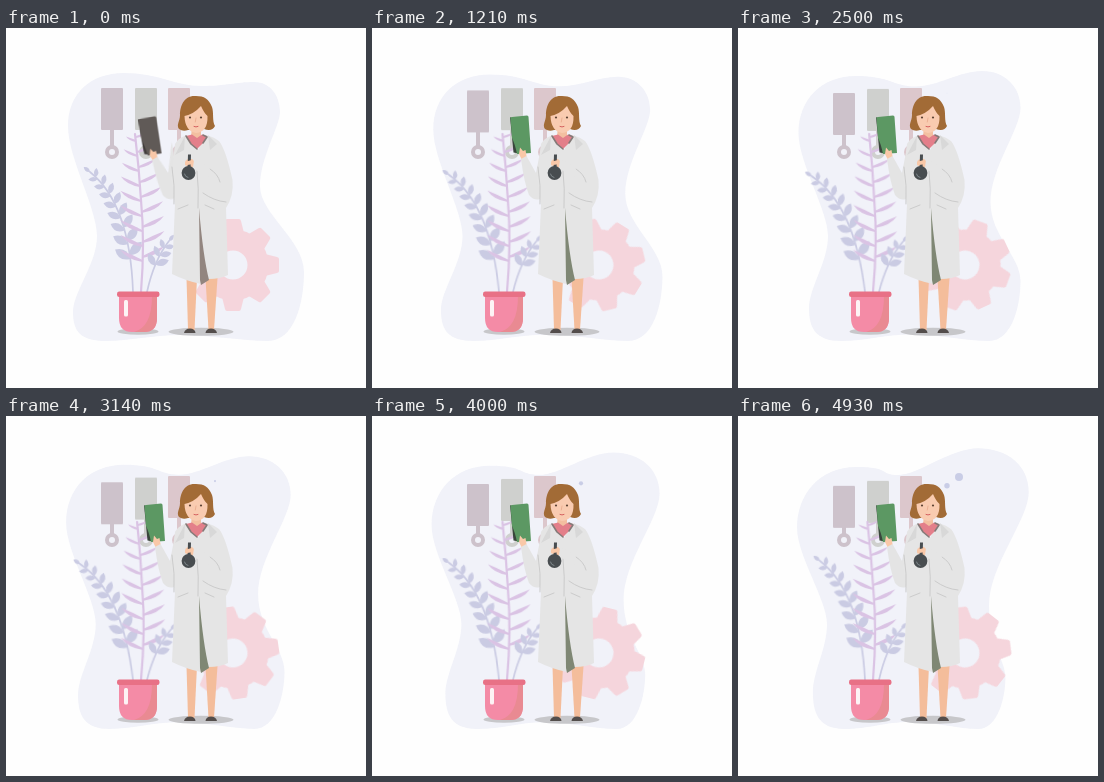
An HTML page that plays this animation: 360 by 360 pixels, repeating every 5 s.

```html
<!DOCTYPE html>
<html lang="en">
<head>
<meta charset="utf-8">
<title>Scientist</title>
<style>
html, body { margin: 0; width: 100%; height: 100%; overflow: hidden; background: #fefefe; }
svg { display: block; width: 100vw; height: 100vh; }
.line { fill: none; stroke-linecap: round; stroke-linejoin: round; }

/* 14 pictures a second, started a touch early */
#blob, #gear, .low { animation: 5s steps(70) -6ms infinite; }
#blob { animation-name: morph; }
#gear { animation-name: spin; }
.low { animation-name: drop; }
.mid { animation: sink 5s cubic-bezier(.6, 0, .8, .6) infinite; }
#fern, #palm, #sprig { animation: sway 5s infinite; }
#fern { --lean: -5deg; transform-origin: 127px 264px; }
#palm { --lean: .8deg; transform-origin: 135px 264px; }
#sprig { --lean: 2deg; transform-origin: 141px 264px; }
#forearm { animation: lift 5s infinite; transform-origin: 162px 168px; }
#back { animation: back 5s infinite; }
#screen { animation: screen 5s infinite; }
#gap { animation: gap 5s infinite; }
#dot1 { animation: rise 5s linear infinite, grow1 5s linear infinite; }
#dot2 { animation: grow2 5s linear infinite; }

@keyframes morph {
  from { d: path("M62 98C62 66 84 45 118 45S170 58 195 58S230 54 248 54S274 70 274 84S254 130 254 158S298 212 298 244S288 313 262 313S205 307 175 307S125 313 100 313S67 304 67 284S91 236 91 208S62 130 62 98Z"); }
  to { d: path("M59 112C59 78 82 51 118 51S140 59 160 59S212 32 240 32S291 48 291 76S251 150 251 190S267 244 267 262S260 313 240 313S198 306 172 306S132 313 106 313S75 296 75 276S89 232 89 208S59 140 59 112Z"); }
}
@keyframes spin {
  from { transform: translate(227px, 237px) rotate(0deg); }
  to { transform: translate(227px, 237px) rotate(130deg); }
}
@keyframes drop { to { transform: translateY(10px); } }
@keyframes sink { to { transform: translateY(5px); } }
@keyframes sway {
  0% { transform: rotate(0deg); animation-timing-function: cubic-bezier(.39, .575, .565, 1); }
  53% { transform: rotate(var(--lean)); animation-timing-function: cubic-bezier(.47, 0, .745, .715); }
  100% { transform: rotate(calc(var(--lean) * .18)); }
}
@keyframes lift { 0% { transform: rotate(-4.5deg); } 12%, 100% { transform: none; } }
@keyframes back { 0% { fill: #403c3b; } 12%, 100% { fill: #39463c; } }
@keyframes screen { 0% { fill: #605a57; } 12%, 100% { fill: #5c9863; } }
@keyframes gap { 0% { fill: #92857f; } 12%, 100% { fill: #7f8774; } }
@keyframes rise { 0%, 62% { cy: 65px; } 100% { cy: 70px; } }
@keyframes grow1 { 0%, 46% { r: 0; } 90%, 100% { r: 2.7px; } }
@keyframes grow2 { 0%, 81% { r: 0; } 98%, 100% { r: 4px; } }
</style>
</head>
<body>
<svg viewBox="0 0 360 360">
  <path id="blob" fill="#f1f2f9"/>

  <g id="cards"></g>
  <g fill="#c9cde6"><circle id="dot1" cx="209"/><circle id="dot2" cx="221" cy="61"/></g>
  <g id="gear" fill="#f5d5dc">
    <circle r="25" fill="none" stroke="#f5d5dc" stroke-width="21"/>
  </g>

  <g fill="#c7c7ca">
    <ellipse cx="132" cy="303.5" rx="20.5" ry="3.2"/>
    <ellipse cx="195" cy="303.8" rx="32.5" ry="4"/>
  </g>

  <g id="fern" fill="#cacbe3" stroke="#cacbe3"></g>
  <g id="palm" fill="#dac3e4" stroke="#dac3e4"></g>
  <g id="sprig" fill="#cacbe3" stroke="#cacbe3"></g>

  <path fill="#f48ba6" d="M113 266H151V290Q151 304 138 304H126Q113 304 113 290Z"/>
  <path fill="#e98a92" d="M151 268V290Q151 304 138 304H128Q146 299 146 268Z"/>
  <rect x="111" y="263.5" width="42.5" height="5.5" rx="2.2" fill="#e87186"/>
  <rect x="118" y="272" width="4" height="16.5" rx="1.5" fill="#fdf3f5"/>

  <g fill="#f4bd9b">
    <path d="M180.5 250H191L188.5 302H182Z"/>
    <path d="M199.5 250H211.5L208 302H202.5Z"/>
  </g>
  <g fill="#534d4b">
    <path d="M178 305Q179 300.5 184 300.5T189.5 305Z"/>
    <path d="M199.5 305Q200 300.5 205 300.5T211 305Z"/>
  </g>

  <g id="forearm">
    <path id="back" d="M138 89L150 98L150 126L141.5 124.5Z"/>
    <path id="screen" d="M138.5 90Q138.5 89 140 89L155 87.5Q156.500 87.500 156.500 89L159 125L145 126Q143 116 140 110Z"/>
    <path fill="#f9c8a8" d="M147 126L148 119.5L151 123L153.500 122L155 131L150 132Z"/>
    <path fill="#e4e4e4" d="M149 131L154.500 128L164 145L170 114L174 160L168 171Q162 173 157 167Q152 154 149 131Z"/>
  </g>

  <path fill="#e5e5e5" d="M181 107Q172 110 169 116L165 150L169 176L166 246Q180 253 195 256L203 251Q214 251 222 247L220 180Q228 168 226.500 152Q220 122 213 113Q208 109 200 107L192 122Z"/>
  <path id="gap" d="M193 180L194 252L195 257L203 252Q197 228 193 180Z"/>
  <path class="line" stroke="#cbcbcb" d="M166 139Q169 157 168 176M191 143Q193 160 192 180M197 165Q208 173 220 174M172 181L182 177M199 177L208 181M204 141Q212 146 214 154"/>
  <path fill="#d8d8d8" d="M179 108L169 127L178 122ZM202 107L211 116L204 122Z"/>

  <path fill="#f3bfa0" d="M186 98H195V109L191 112L185 109Z"/>
  <path fill="#e37f8a" d="M180 108L186 106.500L191 110L196 106.500L201 108L197 115L191 121L185 116Z"/>
  <path class="line" stroke="#857a78" stroke-width="1.6" d="M180 108L185 116L191 121M197 107L201 109L197 115"/>

  <path fill="#a26b36" d="M190 68C178 67 174 78 174 87C174 93 170 97 173 101Q177 104 182 102L198 101Q206 104 209 98C206 93 208 85 206 79C203 71 198 68 190 68Z"/>
  <path fill="#f9cbb0" d="M178.500 88Q188 86 195 78Q198 85 201.500 88Q202 104 190 105Q179 103 178.500 88Z"/>
  <g fill="#5d4435"><circle cx="184" cy="89.5" r="1.1"/><circle cx="195" cy="89.5" r="1.1"/></g>
  <path class="line" stroke="#d5605f" d="M188 98.500Q190 99.500 192 98.500"/>
  <path class="line" stroke="#e8a98c" stroke-width=".8" d="M190 90L189.300 94"/>

  <path fill="#f9c8a8" d="M179 134Q181 130 186 131L190 135L189 139Q184 140 179 137Z"/>
  <g fill="#484d50">
    <circle cx="182.5" cy="145" r="6.9"/>
    <path d="M182 126.500H185L184.500 141H181.500Z"/>
  </g>
  <path class="line" stroke="#7f888c" d="M178.500 146Q179 149 182 149.500"/>
  <path fill="#f9c8a8" d="M180 133.500L186 132L188 136L181 137Z"/>
  <path fill="#e5e5e5" d="M188 132Q194 133 203 139L207 151Q194 145 187 139.500Z"/>
</svg>
<script>
const $ = id => document.getElementById(id);
const lerp = (a, b, k) => a + (b - a) * k;
const add = (id, html) => $(id).insertAdjacentHTML('beforeend', html);

function card(x, color, move) {
  add('cards', `<g fill="${color}">
    <rect x="${x + 9}" y="90" width="4" height="29"/>
    <circle cx="${x + 11}" cy="124" r="5" fill="none" stroke="${color}" stroke-width="4"/>
    <rect class="${move}" x="${x}" y="60" width="22" height="42" rx="1"/></g>`);
}
card(95, '#cdc2cb', 'low');
card(129, '#cfd0ce', 'mid');
card(162, '#dcc7cc', '');

for (let a = 0; a < 360; a += 45)
  add('gear', `<path transform="rotate(${a})" d="M32 -11L44 -8Q46 -7.5 46 -6V6Q46 7.5 44 8L32 11Z"/>`);

function leaf(id, x, y, len, deg) {
  const w = len * .5;
  add(id, `<path stroke="none" transform="translate(${x} ${y}) rotate(${deg})"
    d="M0 0Q${w} ${-w} ${len} 0Q${w} ${w} 0 0Z"/>`);
}

// Leaves in pairs along a quadratic stem, smaller towards the tip
function branch(id, [a, b, c], pairs, from, big, small) {
  add(id, `<path class="line" stroke-width="1.7" d="M${a}Q${b} ${c}"/>`);
  const spot = k => {
    const p = a.map((v, j) => lerp(v, b[j], k)), q = b.map((v, j) => lerp(v, c[j], k));
    const deg = Math.atan2(q[1] - p[1], q[0] - p[0]) * 180 / Math.PI;
    return [lerp(p[0], q[0], k), lerp(p[1], q[1], k), deg];
  };
  for (let i = 0; i < pairs; i++) {
    const k = i / pairs;
    for (const side of [-1, 1]) {
      const [x, y, deg] = spot(lerp(from, 1, k) + (side > 0 ? .025 : 0));
      leaf(id, x, y, lerp(big, small, k), deg + side * 50);
    }
  }
  const [x, y, deg] = spot(1);
  leaf(id, x, y, small, deg);
}
branch('fern', [[127, 264], [124, 176], [84, 144]], 8, .2, 18, 8);
branch('sprig', [[141, 264], [148, 232], [163, 213]], 3, .45, 14, 8);

// Thin fronds sweep out and up on both sides of the palm
add('palm', '<path class="line" stroke-width="2.2" d="M135 264Q139 215 135 172Q133 140 129 106"/>');
for (let i = 0; i < 9; i++) {
  const x = 136.5 - 6.5 * (i / 8) ** 2, w = 22 - 12 * (i / 8) ** 3, h = w * .55;
  for (const side of [-1, 1]) {
    const y = 234 - i * 15 - (side > 0 ? 4 : 0);
    add('palm', `<path stroke="none" transform="translate(${x} ${y}) scale(${side} 1)"
      d="M0 0Q${w * .7} ${-h * .2} ${w} ${-h}Q${w * .5} ${-h * .65} 0 -2Z"/>`);
  }
}
</script>
</body>
</html>
```
